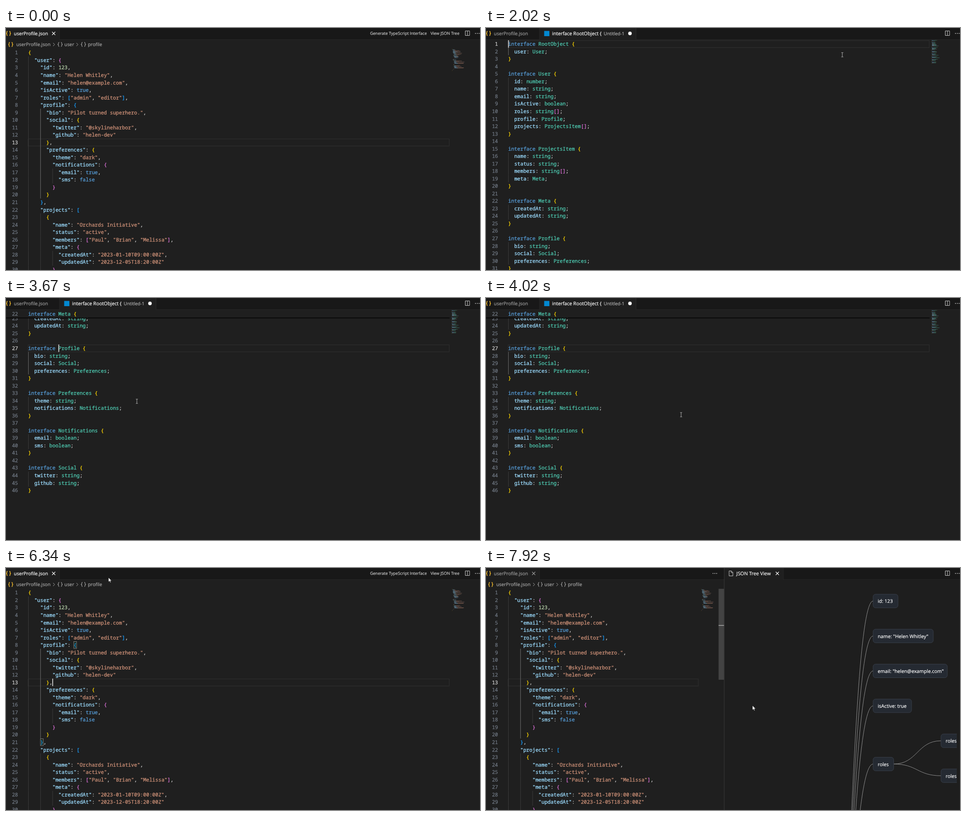
An HTML page for the animation above (7990 ms loop, 1047x535 px).

```html
<!DOCTYPE html>
<html lang="en">
<head>
<meta charset="utf-8">
<title>JSON to TypeScript</title>
<style>
html, body { margin: 0; width: 100%; height: 100%; overflow: hidden; background: #1f1f1f; }
svg { display: block; width: 1047px; height: 535px; }
text { white-space: pre; text-rendering: geometricPrecision; stroke-width: 0.2px; font: 10.4px "Open Sans", "Noto Sans", sans-serif; }
.code text { stroke-width: 0.32px; font: 11.15px "Noto Sans Mono", "DejaVu Sans Mono", monospace; }
</style>
</head>
<body>
<svg id="stage" viewBox="0 0 1047 535"></svg>
<script>
const LOOP = 7990, CW = 6.69, ROW = 16.53, LEFT = 49;
const BG = '#1f1f1f', BAR = '#181818', EDGE = '#2b2b2b', DIM = '#9d9d9d', TXT = '#cccccc', GUTTER = '#6e7681';
const GUIDE = '#404040', GUIDE_ON = '#707070', LINK = '#4e94ce';
const PAIRS = ['#ffd700', '#da70d6', '#179fff'];
const stage = document.getElementById('stage');

function el(name, attrs, parent, content) {
  const node = document.createElementNS('http://www.w3.org/2000/svg', name);
  set(node, attrs);
  if (content !== undefined) node.textContent = content;
  parent.appendChild(node);
  return node;
}
function set(node, attrs) {
  for (const k in attrs) node.setAttribute(k, attrs[k]);
}
function show(node, on) {
  node.style.display = on ? '' : 'none';
}
// Text carries a hairline stroke of its own colour for a sturdier weight.
const ink = colour => ({ fill: colour, stroke: colour });
const group = (parent, cls = '') => el('g', { class: cls }, parent);
const rect = (p, x, y, width, height, fill, more = {}) => el('rect', { x, y, width, height, fill, ...more }, p);
const path = (p, d, stroke, width = 1) => el('path', { d, stroke, fill: 'none', 'stroke-width': width }, p);
const label = (p, x, mid, str, fill = TXT, size = 10.4) => {
  const node = el('text', { x, y: mid + size * 0.36, ...ink(fill) }, p, str);
  node.style.fontSize = size + 'px';
  return node;
};

const project = (name, status, members, created, updated, end) => `      {
        "name": "${name}",
        "status": "${status}",
        "members": [${members}],
        "meta": {
          "createdAt": "${created}",
          "updatedAt": "${updated}"
        }
      }${end}`;

const JSON_SRC = `{
  "user": {
    "id": 123,
    "name": "Helen Whitley",
    "email": "helen@example.com",
    "isActive": true,
    "roles": ["admin", "editor"],
    "profile": {
      "bio": "Pilot turned superhero.",
      "social": {
        "twitter": "@skylineharbor",
        "github": "helen-dev"
      },
      "preferences": {
        "theme": "dark",
        "notifications": {
          "email": true,
          "sms": false
        }
      }
    },
    "projects": [
${project('Orchards Initiative', 'active', '"Paul", "Brian", "Melissa"', '2023-01-10T09:00:00Z', '2023-12-05T18:20:00Z', ',')}
${project('Harbor Survey', 'paused', '"Paul", "Laura"', '2023-03-14T09:00:00Z', '2023-11-02T10:45:00Z', '')}
    ]
  }
}`;

const TS_SRC = [
  'RootObject|user: User',
  'User|id: number|name: string|email: string|isActive: boolean|roles: string[]|profile: Profile|projects: ProjectsItem[]',
  'ProjectsItem|name: string|status: string|members: string[]|meta: Meta',
  'Meta|createdAt: string|updatedAt: string',
  'Profile|bio: string|social: Social|preferences: Preferences',
  'Preferences|theme: string|notifications: Notifications',
  'Notifications|email: boolean|sms: boolean',
  'Social|twitter: string|github: string'
].map(s => {
  const [name, ...fields] = s.split('|');
  return `interface ${name} {\n${fields.map(f => `  ${f};\n`).join('')}}`;
}).join('\n\n');

let depth = 0;
function colour(tok, next) {
  if (/^[{[]$/.test(tok)) return PAIRS[depth++ % 3];
  if (/^[}\]]$/.test(tok)) return PAIRS[--depth % 3];
  if (/^(true|false|interface)$/.test(tok)) return '#569cd6';
  if (/^\d/.test(tok)) return '#b5cea8';
  if (/^["\w]/.test(tok) && next === ':') return '#9cdcfe';
  if (tok[0] === '"') return '#ce9178';
  return /^\w/.test(tok) ? '#4ec9b0' : TXT;
}

function tokens(line) {
  return [...line.matchAll(/"[^"]*"|\w+|[{}[\]]|[^\w"{}[\]]+/g)].map(m => ({
    str: m[0], col: m.index, fill: colour(m[0], line[m.index + m[0].length])
  }));
}

function drawRow(parent, toks, mid) {
  const row = el('text', { x: LEFT, y: mid + 3.9 }, parent);
  return toks.map(t => el('tspan', ink(t.fill), row, t.str));
}

const lineNumber = (p, n, mid) => el('text', { x: 26.5, y: mid + 3.9, 'text-anchor': 'end', ...ink(GUTTER) }, p, n);

// One editor: current-line box, guides, numbered rows and minimap.
function editor(src, first) {
  const root = group(stage, 'code'), body = group(root), map = group(root);
  map.setAttribute('opacity', 0.5);
  const mark = rect(body, LEFT, 0, 930, ROW - 1, 'none', { stroke: '#2c2c2c', 'stroke-width': 1.4 });
  const rows = [], nums = [];
  depth = 0;
  src.split('\n').forEach((line, i) => {
    const mid = first + i * ROW, indent = line.search(/\S/);
    for (let c = 0; c < indent; c += 4) {
      const x = LEFT + c * CW + 0.5;
      path(body, `M${x} ${mid - ROW / 2}v${ROW}`, GUIDE, 0.9);
    }
    const toks = tokens(line);
    nums.push(lineNumber(body, i + 1, mid));
    rows.push(drawRow(body, toks, mid));
    for (const t of toks) {
      if (t.str.trim()) rect(map, t.col * 0.57, i * 1.135, t.str.length * 0.57, 0.8, t.fill);
    }
  });
  const guide = path(body, '', GUIDE_ON, 0.9);
  const caret = rect(body, 0, 0, 1.7, ROW, '#dddddd');
  const midOf = n => first + (n - 1) * ROW;
  return {
    root, body, map, mark, rows, caret,
    select(line, from, to, col) {
      nums.forEach((n, i) => set(n, ink(i + 1 === line ? TXT : GUTTER)));
      mark.setAttribute('y', midOf(line) - ROW / 2 + 0.7);
      guide.setAttribute('d', `M${LEFT + col * CW + 0.5} ${midOf(from) - ROW / 2}V${midOf(to) + ROW / 2}`);
    },
    placeCaret(line, col) {
      set(caret, { x: LEFT + col * CW - 0.2, y: midOf(line) - ROW / 2 });
    }
  };
}

function braces(p, x, y, stroke, w = 1.1) {
  const half = s => {
    const a = s * 1.6, b = s * 1.7;
    return `M${x + s * 2} ${y - 4.7}q${a} 0 ${a} 1.7v1.3q0 1.7 ${b} 1.7q${-b} 0 ${-b} 1.7v1.3q0 1.7 ${-a} 1.7`;
  };
  path(p, half(-1) + half(1), stroke, w);
}
const cross = (p, x, y, stroke) => path(p, `M${x - 3.5} ${y - 3.5}l7 7m0 -7l-7 7`, stroke, 1.1);
function dots(p, x, y) {
  for (const d of [-4, 0, 4]) el('circle', { cx: x + d, cy: y, r: 0.95, fill: TXT }, p);
}

rect(stage, 0, 0, 1047, 535, BG);

// JSON editor
const json = editor(JSON_SRC, 54.5);
json.select(13, 9, 20, 4);
json.placeCaret(13, 8);
const match = group(json.body);
for (const [line, col] of [[8, 15], [21, 4]]) {
  rect(match, LEFT + col * CW + 0.3, 54.5 + (line - 1) * ROW - 7.7, CW - 0.4, 15.4, '#006400',
    { 'fill-opacity': 0.1, stroke: '#888888', 'stroke-width': 0.9 });
}
const crumbs = group(stage);
braces(crumbs, 10.5, 36.5, '#fbc02d', 1.4);
label(crumbs, 22.7, 36.5, 'userProfile.json', '#a9a9a9');
for (const x of [104, 155.5]) path(crumbs, `M${x} 33l3.5 3.5l-3.5 3.5`, '#a9a9a9');
braces(crumbs, 119.5, 36.3, TXT, 1);
label(crumbs, 129, 36.5, 'user', '#a9a9a9');
braces(crumbs, 171, 36.3, TXT, 1);
label(crumbs, 181, 36.5, 'profile', '#a9a9a9');

// TypeScript editor
const ts = editor(TS_SRC, 35.3);
ts.map.setAttribute('transform', 'translate(984 26.8)');
const sticky = group(ts.root);
rect(sticky, 0, 26, 980, 17.5, BG);
rect(sticky, 0, 43.3, 980, 1.7, '#060606');
lineNumber(sticky, 22, 35.3);
depth = 0;
drawRow(sticky, tokens('interface Meta {'), 35.3);
const links = [
  { node: ts.rows[10][3], from: 3040, to: 3340 },
  { node: ts.rows[29][3], from: 4540, to: 4640 }
];
for (const l of links) l.fill = l.node.getAttribute('fill');

// Tab bar
rect(stage, 0, 0, 1047, 26, BAR);
rect(stage, 0, 25.3, 1047, 0.9, EDGE);
const tabBg = rect(stage, 0, 0, 118, 26.4, BG);
rect(stage, 117.7, 0, 0.9, 26, EDGE);
braces(stage, 5.5, 12, '#fbc02d', 1.4);
const tabText = label(stage, 17.3, 12.5, 'userProfile.json', '#ffffff');
const tabClose = cross(stage, 105.3, 12, '#ffffff');

const tsTab = group(stage);
rect(tsTab, 331, 0, 0.9, 26, EDGE);
rect(tsTab, 128.5, 6.5, 11.5, 11.5, '#0288d1');
label(tsTab, 146, 12.5, 'interface RootObject {', '#ffffff', 10.7);
label(tsTab, 260, 12.8, 'Untitled-1', '#b4b4b4', 9.9);
el('circle', { cx: 318, cy: 12, r: 3.9, fill: '#ffffff' }, tsTab);

const actions = group(stage);
const buttons = [[801.5, 130, 'Generate TypeScript Interface'], [935, 70.5, 'View JSON Tree']].map(([x, w, str]) => {
  const bg = rect(actions, x, 1.5, w, 20.5, '#313232', { rx: 4 });
  label(actions, x + 2.7, 12, str, TXT, 9.05);
  return { x, w, bg };
});

// Split view with the tree
const split = group(stage);
rect(split, 526, 26, 521, 509, '#1e1e1e');
rect(split, 527, 0, 129.5, 26.4, BG);
rect(split, 656.5, 0, 0.9, 26, EDGE);
rect(split, 525.7, 0, 1, 535, '#3a3a3a');
dots(split, 505.5, 12);
path(split, 'M537 6.5h5l3.3 3.3v7.7h-8.3zM541.7 6.5v3.6h3.6', TXT);
label(split, 553, 12.5, 'JSON Tree View', '#ffffff', 10.8);
cross(split, 643.5, 12, '#ffffff');
rect(split, 513.7, 46, 12, 201, '#434343');
rect(split, 513.7, 126, 12, 1.8, '#9a9a9a');

const clip = el('clipPath', { id: 'view' }, el('defs', {}, stage));
rect(clip, 527, 27, 513, 508, '#fff');
const tree = group(stage);
tree.setAttribute('clip-path', 'url(#view)');
function edge(x1, y1, x2, y2) {
  const m = (x1 + x2) / 2;
  path(tree, `M${x1} ${y1}C${m} ${y1} ${m} ${y2} ${x2} ${y2}`, '#969696', 0.95);
}
function treeNode(x, y, w, str) {
  rect(tree, x, y - 15, w, 30, '#252a32', { rx: 5.5, stroke: '#3b424d', 'stroke-width': 0.9 });
  label(tree, x + 10.3, y + 0.4, str, '#ffffff', 10.7);
}
const leafY = i => 73 + i * 77.25;
const leaves = [[55, 'id: 123'], [133, 'name: "Helen Whitley"'], [164, 'email: "helen@example.com"'], [85, 'isActive: true']];
const rolesY = leafY(4.665);
leaves.forEach((_, i) => edge(748, 1270, 855, leafY(i)));
edge(748, 1270, 855, rolesY);
for (const i of [4, 5]) edge(900.5, rolesY, 1005, leafY(i));
leaves.forEach(([w, str], i) => treeNode(855, leafY(i), w, str));
treeNode(855, rolesY, 45.5, 'roles');
treeNode(1005, leafY(4), 92, 'roles[0]: "admin"');
treeNode(1005, leafY(5), 92, 'roles[1]: "editor"');

path(stage, 'M1014.5 6.5h9.5v10h-9.5zM1019.2 6.5v10', TXT);
dots(stage, 1041, 12);

// Mouse pointer shapes, hot spot at the origin
const pointer = group(stage);
const solid = d => el('path', { d, fill: '#ffffff', stroke: '#111111', 'stroke-width': 0.7, 'stroke-linejoin': 'round' }, pointer);
const shapes = {
  arrow: solid('M0 0V10L2.4 7.9L4 11.4L5.6 10.7L4.1 7.3H7.2Z'),
  hand: solid('M-1.5 6.6V1Q-1.5 -.2 -.4 -.2T.7 1V4.9Q4.6 5.1 5.8 6.4V9.4Q5.8 11.4 4.7 13.4H-1Q-1.8 11.2 -4.2 8.2Q-3.4 6.6 -1.5 8.6Z'),
  beam: path(pointer, 'M-2.2 -4.8h1.6q.6 0 .6 .6v8.4q0 .6 -.6 .6h-1.6M2.2 -4.8h-1.6q-.6 0 -.6 .6M0 4.2q0 .6 .6 .6h1.6', '#c8c8c8', 0.9)
};

const moves = [
  [180, 846, 461], [520, 915, 205], [880, 1000, 10], [1010, 1000, 10], [1290, 918, 10], [1490, 884, 10],
  [1830, 884, 10], [2200, 640, 130], [2560, 410, 220], [3100, 158, 201], [3340, 158, 201], [4020, 431, 258],
  [4280, 431, 258], [4560, 186, 160], [4650, 186, 160], [5020, 319, 250], [5200, 285, 281], [5440, 209.5, 257],
  [5860, 20, 172], [6020, 48, 9], [6090, 48, 9], [6670, 640, 40], [7080, 986, 17], [7250, 986, 17],
  [7510, 815, 237], [7650, 779, 254], [7720, 766, 276], [7920, 588.5, 304], [7990, 588.5, 304]
];

function slope(i, k) {
  const a = moves[i - 1], b = moves[i], c = moves[i + 1];
  if (!a || !c || (a[1] === b[1] && a[2] === b[2]) || (b[1] === c[1] && b[2] === c[2])) return 0;
  return (c[k] - a[k]) / (c[0] - a[0]);
}
function pointerAt(t) {
  let i = 0;
  while (i < moves.length - 2 && t >= moves[i + 1][0]) i++;
  const a = moves[i], b = moves[i + 1], span = b[0] - a[0];
  const u = Math.min(1, Math.max(0, (t - a[0]) / span)), v = 1 - u;
  return [1, 2].map(k =>
    a[k] * v * v * (1 + 2 * u) + b[k] * u * u * (3 - 2 * u) +
    span * u * v * (slope(i, k) * v - slope(i + 1, k) * u));
}

const OPEN_TS = 1830, GO_PROFILE = 3340, GO_PREFS = 4640, BACK = 6060, SPLIT = 7250, TREE = 7380;
const jumps = [[OPEN_TS, 1, 2, 2, 0], [GO_PROFILE, 27, 28, 30, 10], [GO_PREFS, 33, 34, 35, 10]];
const blink = since => Math.floor(since / 500) % 2 === 0;

function draw(t) {
  const inTs = t >= OPEN_TS && t < BACK, isSplit = t >= SPLIT, focused = t >= BACK && !isSplit;
  const [x, y] = pointerAt(t);

  show(json.root, !inTs);
  show(crumbs, !inTs);
  show(ts.root, inTs);
  show(tsTab, inTs);
  show(actions, !inTs && !isSplit);
  show(split, isSplit);
  show(tree, t >= TREE);
  show(match, focused);
  show(json.caret, focused && blink(t - BACK));
  json.mark.setAttribute('width', isSplit ? 420 : 930);
  json.map.setAttribute('transform', `translate(${isSplit ? 475 : 985} 46.3)`);

  const tabFill = inTs || isSplit ? DIM : '#ffffff';
  set(tabText, ink(tabFill));
  tabClose.setAttribute('stroke', tabFill);
  show(tabClose, !inTs);
  set(tabBg, inTs ? { x: 118.5, width: 212.5 } : { x: 0, width: 117.7 });

  let onLink = false;
  if (inTs) {
    const [since, line, from, to, col] = jumps.filter(j => t >= j[0]).pop();
    const scrolled = t >= GO_PROFILE;
    ts.select(line, from, to, 0);
    ts.placeCaret(line, col);
    show(ts.caret, blink(t - since));
    show(sticky, scrolled);
    ts.body.setAttribute('transform', `translate(0 ${scrolled ? -354 : 0})`);
    for (const l of links) {
      const on = t >= l.from && t < l.to;
      onLink = onLink || on;
      set(l.node, { ...ink(on ? LINK : l.fill), 'text-decoration': on ? 'underline' : 'none' });
    }
  }

  let onButton = false;
  for (const b of buttons) {
    const over = !inTs && !isSplit && t >= 180 && y < 22 && x >= b.x && x <= b.x + b.w;
    show(b.bg, over);
    onButton = onButton || over;
  }

  const onTab = y < 26 && x < (inTs ? 331 : 118);
  const inCode = y > 27 && x > 42 && x < (isSplit ? 470 : 980);
  const kind = onLink || onButton || onTab ? 'hand' : inCode ? 'beam' : 'arrow';
  for (const k in shapes) show(shapes[k], k === kind);
  show(pointer, t >= 180);
  pointer.setAttribute('transform', `translate(${x} ${y})`);
}

const start = performance.now();
function tick() {
  draw((performance.now() - start) % LOOP);
  requestAnimationFrame(tick);
}
tick();
</script>
</body>
</html>
```
